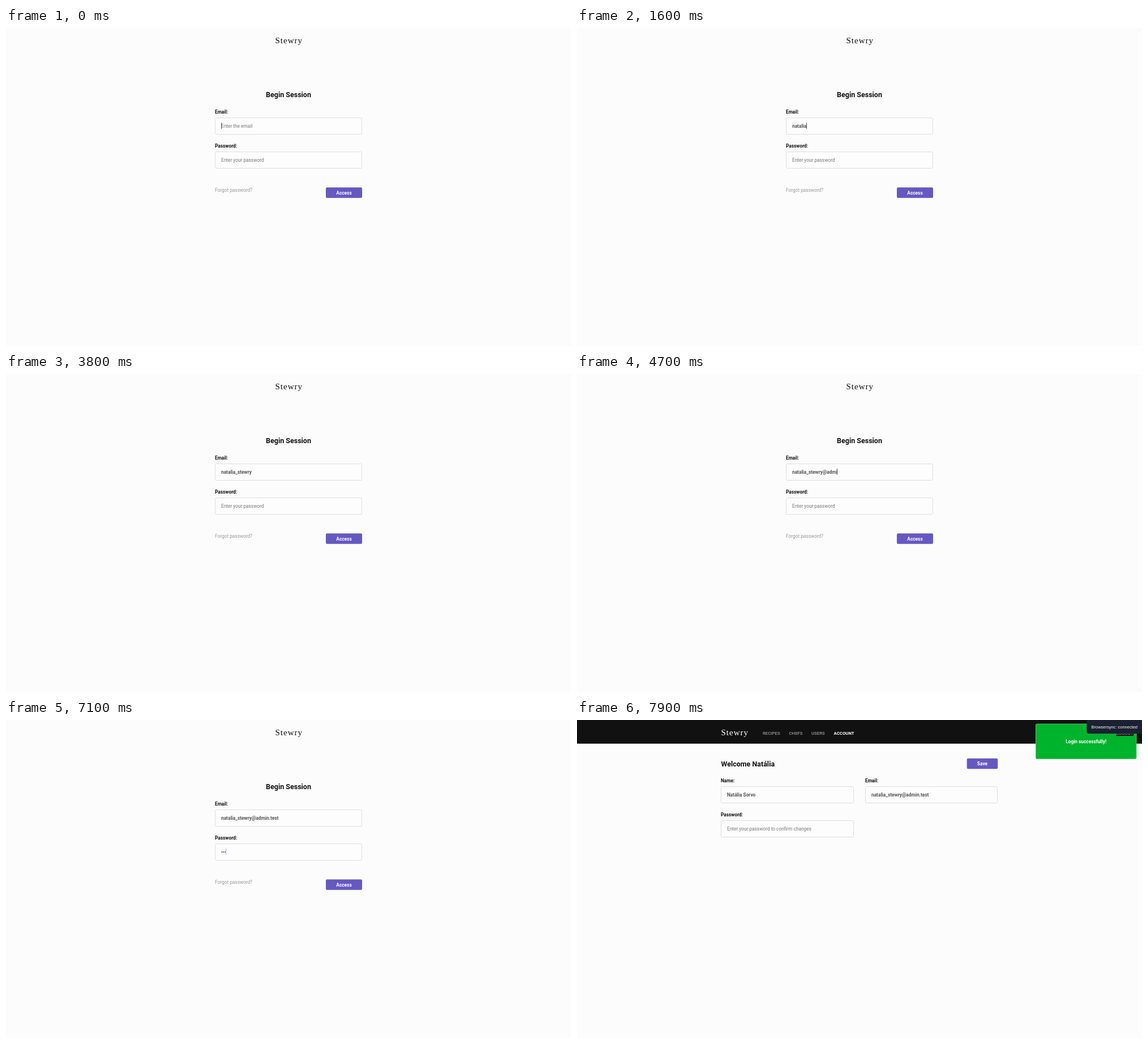
These frames come from a looping animation (998x561 px, 8000 ms). An HTML page with a canvas:

```html
<!DOCTYPE html>
<html lang="en">
<head>
<meta charset="utf-8">
<title>Sign in</title>
<style>
  html, body { margin: 0; width: 100%; height: 100%; overflow: hidden; background: #fcfcfc; }
  canvas { display: block; }
</style>
</head>
<body>
<canvas id="stage" width="998" height="561"></canvas>
<script>
const ctx = document.getElementById('stage').getContext('2d');
const LOOP = 8000;
const BODY = 8.32, HEADING = 12.48, NAV = 7.8;
const INK = '#111', VALUE = '#555', HINT = '#777', MUTED = '#999', PURPLE = '#6558c3';
const EMAIL = 'natalia_stewry@admin.test';

// Moments at which the typed e-mail reaches a given length.
const emailKeys = [
  ...Array.from({ length: 7 }, (_, i) => [1000 + i * 100, i + 1]),
  [2400, 9], [2500, 11],
  [3100, 12], [3200, 13], [3300, 14],
  [4000, 15], [4100, 16], [4200, 17],
  [4500, 18], [4700, 19], [4800, 20],
  [5000, 21], [5100, 22], [5200, 24], [5300, 25]
];
const passwordKeys = [[6200, 1], [6400, 2], [6600, 3]];
const FOCUS_PASSWORD = 5500, LOGGED_IN = 7200, NOTICE = 7500;

function text(str, x, y, { size = BODY, weight = 400, color = INK, align = 'left', family = 'Roboto, sans-serif', spacing = 0 } = {}) {
  ctx.font = `${weight} ${size}px ${family}`;
  ctx.letterSpacing = spacing + 'px';
  ctx.textAlign = align;
  ctx.fillStyle = color;
  ctx.fillText(str, x, y);
  return ctx.measureText(str).width;
}

const bold = (str, x, y, options) => text(str, x, y, { weight: 700, ...options });

function box(x, y, w, h, fill, radius = 0, stroke) {
  ctx.beginPath();
  ctx.roundRect(x, y, w, h, radius);
  ctx.fillStyle = fill;
  ctx.fill();
  if (stroke) {
    ctx.lineWidth = 1;
    ctx.strokeStyle = stroke;
    ctx.stroke();
  }
}

function logo(x, color) {
  text('Stewry', x, 26.5, { size: 15, color, family: '"Liberation Serif", serif', spacing: 1 });
}

function field(label, x, y, w, value, hint) {
  bold(label, x, y - 7.4);
  box(x + 0.5, y + 0.5, w - 1, 29, '#fdfdfd', 2, '#dddddd');
  const left = x + 11, base = y + 17.5;
  if (value) return left + bold(value, left, base, { color: VALUE });
  text(hint, left, base, { color: HINT });
  return left;
}

function button(label, x, y, w) {
  box(x, y, w, 18.5, PURPLE, 2);
  bold(label, x + w / 2, y + 12.2, { color: '#fff', align: 'center' });
}

function caret(x, y, color) {
  ctx.fillStyle = color;
  ctx.fillRect(Math.floor(x), y, 1, 11);
}

// The last key pressed so far, as [time, length].
const lastKey = (keys, t, start) => keys.reduce((last, key) => (key[0] <= t ? key : last), [start, 0]);

function loginPage(t) {
  const inPassword = t >= FOCUS_PASSWORD;
  const [emailTime, emailLength] = lastKey(emailKeys, t, 0);
  const [passTime, passLength] = lastKey(passwordKeys, t, FOCUS_PASSWORD);

  logo(475.5, INK);
  bold('Begin Session', 499, 122.4, { size: HEADING, align: 'center' });
  const emailEnd = field('Email:', 369, 158, 260, EMAIL.slice(0, emailLength), 'Enter the email');
  const passEnd = field('Password:', 369, 218, 260, '•'.repeat(passLength), 'Enter your password');
  text('Forgot password?', 369, 289.4, { color: MUTED });
  button('Access', 565, 281.3, 64);

  const idle = t - (inPassword ? passTime : emailTime);
  const visible = Math.floor(idle / 500) % 2 === 0;
  const [x, y] = inPassword ? [passEnd, 227] : [emailEnd, 167];
  if (visible) caret(x, y, '#555');
  else if (t >= 7100) caret(x, y, '#aaa6dd');
}

function accountPage(t) {
  box(0, 0, 998, 41.7, INK);
  logo(254.5, '#fff');
  [['RECIPES', 328], ['CHEFS', 374.5], ['USERS', 414]].forEach(([label, x]) =>
    text(label, x, 26.3, { size: NAV, weight: 500, color: MUTED }));
  bold('ACCOUNT', 453.5, 26.3, { size: NAV, color: '#fff' });

  bold('Welcome Natália', 254.5, 81.6, { size: HEADING });
  button('Save', 688.7, 67.8, 54.5);
  field('Name:', 254, 117, 235, 'Natália Sorvo');
  field('Email:', 509, 117, 234, EMAIL);
  field('Password:', 254, 177, 235, '', 'Enter your password to confirm changes');

  box(810.5, 7, 177.5, 61.5, '#00b32d', 2, '#4fc96a');
  bold('Login successfully!', 899.2, 40.5, { color: '#fff', align: 'center' });
  box(952.5, 18.5, 30.5, 9.5, INK);
  text('LOGOUT', 952.7, 26, { size: NAV, weight: 500, color: MUTED });

  if (t >= NOTICE) {
    box(900.5, 0, 97.5, 24, '#1b2032', [0, 0, 0, 3]);
    text('Browsersync: connected', 908.5, 14.7, { size: 7.49, color: '#fff', family: '"Liberation Sans", sans-serif' });
  }
}

function draw(now) {
  const t = now % LOOP;
  box(0, 0, 998, 561, '#fcfcfc');
  (t < LOGGED_IN ? loginPage : accountPage)(t);
}

function tick() {
  draw(performance.now());
  requestAnimationFrame(tick);
}
tick();
</script>
</body>
</html>
```
